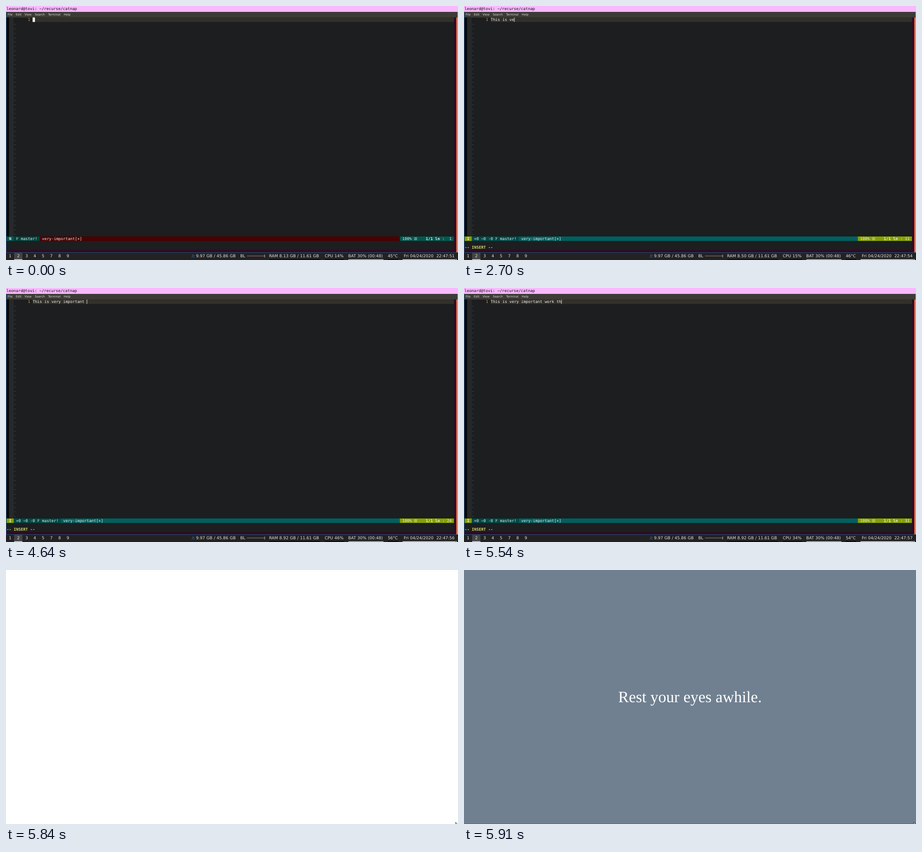
An HTML page for the animation above (9.27 s loop, 998 by 561 pixels).

```html
<!DOCTYPE html>
<html lang="en">
<head>
<meta charset="utf-8">
<title>Catnap</title>
<style>
html, body { margin: 0; width: 100%; height: 100%; overflow: hidden; background: #1c1e1f; }
svg { display: block; width: 100%; height: 100%; }
text { white-space: pre; text-rendering: geometricPrecision; }
.mono text { font: 8.634px "DejaVu Sans Mono", monospace; fill: #eee; }
.mono .b { font-weight: bold; }
.menu text { font: 6.45px "DejaVu Sans", sans-serif; fill: #dfdbd2; }
.bar text { font: 9.01px "DejaVu Sans", sans-serif; word-spacing: .26px; fill: #e2e2e2; }
.rest { font: 35px "Liberation Serif", serif; fill: #fff; text-anchor: middle; }
</style>
</head>
<body>
<svg viewBox="0 0 998 561">
  <g id="desk">
    <rect width="998" height="561" fill="#1c1e1f"/>
    <rect width="998" height="13" fill="#f9b9ff"/>
    <rect y="13" width="998" height="12.4" fill="#3c3b37"/>
    <g id="menu" class="menu"></g>
    <g id="editor" class="mono"></g>
    <g id="normal" class="mono"></g>
    <g id="insert" class="mono"></g>
    <g id="live" class="mono"></g>
    <rect x="989.2" y="25.4" width="4.8" height="518.8" fill="#300a24"/>
    <rect x="994" y="25.4" width="3" height="518.8" fill="#dc6848"/>
    <rect x="997" y="13" width="1" height="531" fill="#f0a8bc"/>
    <rect x="1" y="538.8" width="993" height="5.4" fill="#300a24"/>
    <path d="M.5 13V544.6H998" fill="none" stroke="#235a8c"/>
    <g id="bar" class="bar"></g>
  </g>
  <rect id="blank" width="998" height="561" fill="#fff"/>
  <g id="rest">
    <rect width="998" height="561" fill="#708090"/>
    <rect y="560.2" width="998" height=".8" fill="#56636f"/>
    <text class="rest" x="499" y="292">Rest your eyes awhile.</text>
  </g>
  <path d="M992.8 557V563L997 561.6Z" fill="#ddd" stroke="#111" stroke-width=".8"/>
</svg>
<script>
const LOOP = 9270, CELL = 5.198, ROW = 9.87, LEFT = 1.56, TOP = 25.4;
const $ = id => document.getElementById(id);
const colX = c => LEFT + c * CELL;
const rowY = r => TOP + r * ROW;

function add(parent, tag, attrs, str) {
  const el = document.createElementNS("http://www.w3.org/2000/svg", tag);
  for (const k in attrs) el.setAttribute(k, attrs[k]);
  if (str !== undefined) el.textContent = str;
  return $(parent).appendChild(el);
}
const rect = (p, x, y, width, height, fill) => add(p, "rect", { x, y, width, height, fill });
const label = (p, x, y, str, extra) => add(p, "text", { x, y, ...extra }, str);
const cells = (p, c, r, n, fill, rows = 1) => rect(p, colX(c), rowY(r), n * CELL, rows * ROW, fill);
const put = (p, c, r, str, style) => label(p, colX(c), rowY(r) + 7.7, str, style);
const bold = { class: "b" };
const ink = (color, cls = "") => ({ style: "fill:" + color, class: cls });

// Window title and menu
label("editor", 1, 9, "leonard@tovi: ~/recurse/catnap", ink("#111"));
[["File", 3.8], ["Edit", 21.8], ["View", 41], ["Search", 63.8], ["Terminal", 93], ["Help", 127.6]]
  .forEach(([s, x]) => label("menu", x, 21.2, s));

// Editor body
cells("editor", 0, 0, 1, "#060606", 49);
cells("editor", 1, 0, 2, "#26282a", 49);
cells("editor", 11, 0, 179, "#33302a");
put("editor", 9, 0, "1", ink("#d7a050"));
for (let r = 1; r < 49; r++) put("editor", 3, r, "~", ink("#4b5052"));

// Status line: mode, branch, file name, position
function status(id, mode, git, main, branchBg, fileBg) {
  const end = 4 + git.length + 10;
  cells(id, 0, 49, 190, fileBg);
  cells(id, 0, 49, 3, main);
  cells(id, 3, 49, end - 3, branchBg);
  cells(id, 167, 49, 23, main);
  put(id, 1, 49, mode, bold);
  put(id, 4, 49, git);
  const x = colX(4 + git.length), y = rowY(49);
  add(id, "path", {
    d: `M${x + 1.4} ${y + 1.6}v6.4m0-2.4q2.6-.4 2.6-3.4m-2.6 0h.9`,
    fill: "none", stroke: "#d8dede", "stroke-width": .8
  });
  put(id, 6 + git.length, 49, "master!");
  put(id, end + 1, 49, "very-important[+]");
  put(id, 168, 49, "100%");
  for (let i = 0; i < 3; i++) rect(id, colX(173) + .4, y + 2.4 + i * 2.2, 6.4, .8, "#eee");
  put(id, 178, 49, "1/1", bold);
  put(id, 182, 49, "ln", bold);
  put(id, 185, 49, ":");
}
status("normal", "N", "", "#005850", "#00433f", "#4a0000");
status("insert", "I", "+0 ~0 -0 ", "#86a000", "#004946", "#005f5f");
put("insert", 0, 51, "-- INSERT --", ink("#d8d868", "b"));
const block = cells("normal", 11, 0, 1, "#f4f4f0");
const caret = rect("live", 0, rowY(0), .9, ROW, "#f4f4f0");
const line = put("live", 11, 0, "");
const column = put("live", 187, 49, "");

// Desktop bar
rect("bar", 0, 545.2, 998, 15.8, "#222");
rect("bar", 18, 545.2, 18.2, 15.8, "#444");
[1, 2, 3, 4, 5, 7, 8, 9].forEach((n, i) =>
  label("bar", 9.1 + i * 18.2, 555.3, n, { "text-anchor": "middle" }));
[[18, 18.2, "#f9b9ff"], [581, 113, "#050505"], [704, 42, "#050505"], [756, 77.5, "#ffb52a"],
 [843, 23, "#050505"], [875.5, 117, "#f9b9ff"]]
  .forEach(([x, w, c]) => rect("bar", x, 559.4, w, 1.6, c));
label("bar", 410.2, 555.3, "/", ink("#2a8cff"));
label("bar", 413.3, 555.3, ": 9.97 GB / 45.86 GB");
label("bar", 517.2, 555.3, "BL");
rect("bar", 532, 551.7, 38.5, .8, "#c99aa4");
rect("bar", 570.6, 549, .9, 6.4, "#ddd");
label("bar", 755.6, 555.3, "BAT 30% (00:48)");
const ram = label("bar", 580.7, 555.3, "");
const cpu = label("bar", 703.8, 555.3, "");
const temp = label("bar", 842.9, 555.3, "");
const clock = label("bar", 878.2, 555.3, "");

const phrase = "This is very important work th";
const keys = [1600, 1770, 1910, 2040, 2190, 2330, 2480, 2600, 2700, 2700,
  2830, 2940, 3070, 3200, 3470, 3670, 3800, 3970, 4170, 4270,
  4400, 4540, 4640, 4770, 4870, 5010, 5120, 5270, 5400, 5540];

// Latest value whose start time has passed
const at = (t, steps) => steps.filter(s => s[0] <= t).pop()[1];
const show = (el, on) => { el.style.display = on ? "" : "none"; };
const set = (el, s) => { if (el.textContent !== s) el.textContent = s; };

function draw(t) {
  const typing = t >= 1270;
  const n = keys.filter(k => k <= t).length;
  show($("normal"), !typing);
  show($("insert"), typing);
  show(caret, typing);
  caret.setAttribute("x", colX(11 + n));
  set(line, phrase.slice(0, n));
  set(column, String(n + 1).padStart(2));

  set(ram, `RAM ${at(t, [[0, "8.13"], [1130, "8.50"], [3200, "8.92"]])} GB / 11.61 GB`);
  set(cpu, `CPU ${at(t, [[0, 14], [1130, 15], [3200, 46], [5270, 34]])}%`);
  set(temp, at(t, [[0, 45], [800, 46], [3200, 56], [5270, 54]]) + "°C");
  const sec = 51 + Math.min(6, Math.floor((t + 830) / 1000));
  set(clock, "Fri 04/24/2020  22:47:" + sec);

  show($("desk"), t < 5570);
  show($("blank"), t >= 5570 && t < 5870);
  show($("rest"), t >= 5870);
}

const start = performance.now();
function tick() {
  draw((performance.now() - start) % LOOP);
  requestAnimationFrame(tick);
}
tick();
</script>
</body>
</html>
```
